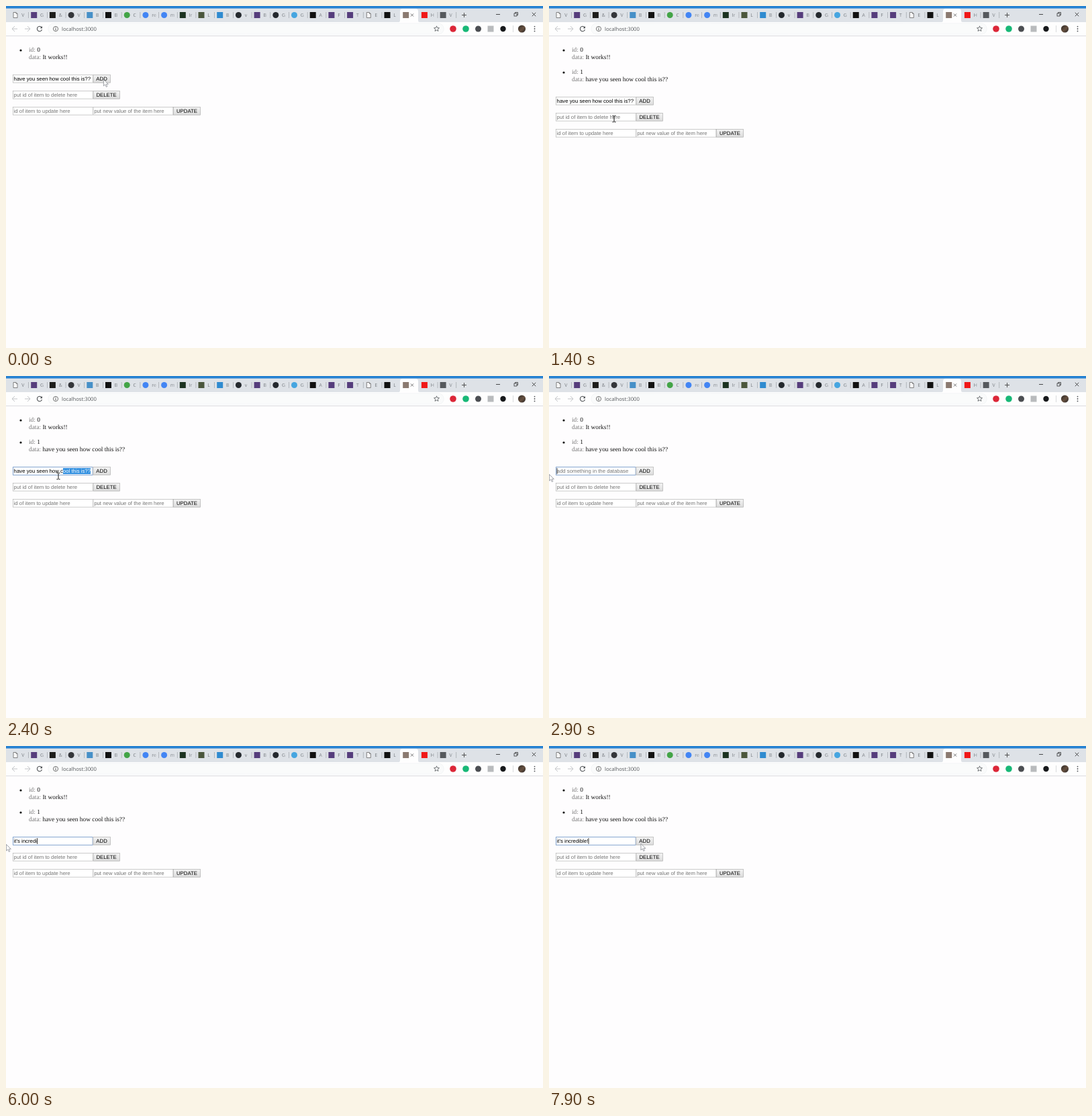
Recreate the animation shown at these times as an HTML page with a canvas. Size 800 px wide and 509 px high, loop 8 s.

```html
<!DOCTYPE html>
<html lang="en">
<head>
<meta charset="utf-8">
<title>Item list</title>
<style>
html, body { margin: 0; width: 100%; height: 100%; overflow: hidden; background: #fefdfe; }
canvas { display: block; width: 800px; height: 509px; }
</style>
</head>
<body>
<canvas id="stage"></canvas>
<script>
const W = 800, H = 509, LOOP = 8000, STEP = 100;
const canvas = document.getElementById('stage');
const ctx = canvas.getContext('2d');
const dpr = window.devicePixelRatio || 1;
canvas.width = W * dpr;
canvas.height = H * dpr;
ctx.textRendering = 'geometricPrecision';

const SERIF = '9.37px "Liberation Serif", "Times New Roman", serif';
const FORM = '7.81px "Liberation Sans", Arial, sans-serif';
const UI = '7.7px "Open Sans", sans-serif';
const TAB = '7px "Open Sans", sans-serif';
const MESSAGE = 'have you seen how cool this is??';

// form controls: field width, row height, border
const FIELD = 119.6, ROW = 12.4, EDGE = 0.6;

// [shape, colour, label]; d = document, s = square, c = circle
const TABS = [
  ['d', '', 'V'], ['s', '#563d7c', 'G'], ['s', '#1d1d1b', '&'], ['c', '#34363a', 'V'],
  ['s', '#4690c8', 'B'], ['s', '#111', 'B'], ['c', '#43a447', 'C'], ['c', '#4285f4', 're'],
  ['c', '#4285f4', 'm'], ['s', '#1c3321', 'Ir'], ['s', '#4b573c', 'L'], ['s', '#2f8bd0', 'B'],
  ['c', '#24292e', 'v'], ['s', '#563d7c', 'B'], ['c', '#24292e', 'G'], ['c', '#45a5e0', 'G'],
  ['s', '#111', 'A'], ['s', '#563d7c', 'F'], ['s', '#563d7c', 'T'], ['d', '', 'E'],
  ['s', '#111', 'L'], ['s', '#8b7a70', ''], ['s', '#f01818', 'H'], ['s', '#55595d', 'V']
];

// pointer stops: [time, x, y, shape]; a = arrow, i = text beam
const POINTER = [
  [0, 145, 109, 'a'], [600, 147, 112, 'a'], [700, 150, 117, 'a'], [800, 152, 121, 'a'],
  [900, 152, 123, 'a'], [1200, 146, 138, 'a'], [1300, 118, 160, 'i'], [1400, 97, 168, 'i'],
  [1500, 98, 173, 'i'], [1700, 112, 163, 'i'], [1900, 127, 146, 'i'], [2000, 130, 141, 'i'],
  [2100, 128, 141, 'i'], [2200, 122, 143, 'i'], [2300, 106, 145, 'i'], [2400, 78, 149, 'i'],
  [2500, 34, 152, 'i'], [2600, 0, 146, 'a'], [7400, 4, 146, 'a'], [7500, 32, 145, 'a'],
  [7600, 82, 143, 'a'], [7700, 130, 143, 'a'], [7800, 147, 144, 'a'], [7900, 136.5, 145, 'a']
];
// pauses before the next move
const RESTS = [0, 900, 2600];

const KEYS = [
  [2900, ''], [3500, 'i'], [3600, 'it'], [3800, "it's"], [3900, "it's "], [5100, "it's i"],
  [5300, "it's inc"], [5500, "it's incr"], [5700, "it's incre"], [5800, "it's incred"],
  [6000, "it's incredi"], [6200, "it's incredib"], [6300, "it's incredibl"],
  [6400, "it's incredible"], [6800, "it's incredible!"], [6900, "it's incredible!"]
];

// first selected character while dragging left
const DRAG = [[2100, 32], [2200, 31], [2300, 26], [2400, 19], [2500, 6], [2600, 0]];

function at(list, t) {
  let hit = list[0];
  for (const item of list) if (item[0] <= t) hit = item;
  return hit;
}

function rect(x, y, w, h, color) {
  ctx.fillStyle = color;
  ctx.fillRect(x, y, w, h);
}

function disc(x, y, r, color) {
  ctx.fillStyle = color;
  ctx.beginPath();
  ctx.arc(x, y, r, 0, Math.PI * 2);
  ctx.fill();
}

function path(points, stroke, width, fill, close) {
  ctx.beginPath();
  points.forEach(([x, y], i) => i ? ctx.lineTo(x, y) : ctx.moveTo(x, y));
  if (close) ctx.closePath();
  if (fill) { ctx.fillStyle = fill; ctx.fill(); }
  if (stroke) { ctx.strokeStyle = stroke; ctx.lineWidth = width; ctx.stroke(); }
}

function frame(x, y, w, h, edge, color) {
  ctx.strokeStyle = color;
  ctx.lineWidth = edge;
  ctx.strokeRect(x + edge / 2, y + edge / 2, w - edge, h - edge);
}

function text(str, x, y, font, color) {
  ctx.font = font;
  ctx.fillStyle = color;
  ctx.fillText(str, x, y);
}

function widthOf(str) {
  ctx.font = FORM;
  return ctx.measureText(str).width;
}

function drawTab([shape, color, label], i) {
  const x = 14 + i * 27.7, y = 13.5;
  const active = i === 21;
  if (active) {
    ctx.fillStyle = '#fefefe';
    ctx.beginPath();
    ctx.moveTo(585, 24);
    ctx.quadraticCurveTo(587, 24, 587, 21);
    ctx.lineTo(587, 8);
    ctx.quadraticCurveTo(587, 4, 591, 4);
    ctx.lineTo(610, 4);
    ctx.quadraticCurveTo(614, 4, 614, 8);
    ctx.lineTo(614, 21);
    ctx.quadraticCurveTo(614, 24, 616, 24);
    ctx.fill();
  }
  if (shape === 's') rect(x - 4.5, y - 4.5, 9, 9, color);
  else if (shape === 'c') disc(x, y, 4.5, color);
  else {
    path([[x - 3, y - 4], [x + 1, y - 4], [x + 3, y - 2], [x + 3, y + 4], [x - 3, y + 4]], '#666', 0.8, '#f8f8f8', true);
    path([[x + 1, y - 4], [x + 1, y - 2], [x + 3, y - 2]], '#666', 0.7);
  }
  if (label) {
    const g = ctx.createLinearGradient(x + 9, 0, x + 17, 0);
    g.addColorStop(0, '#5f6469');
    g.addColorStop(1, '#b9bdc2');
    text(label, x + 9.3, 16, TAB, g);
  }
  if (i !== 20 && !active) rect(x + 19.3, 9, 0.7, 9, '#a0a4a9');
}

function cross(x, y, r, color) {
  path([[x - r, y - r], [x + r, y + r]], color, 0.8);
  path([[x + r, y - r], [x - r, y + r]], color, 0.8);
}

function arrowIcon(x, y, dir) {
  path([[x - 4 * dir, y], [x + 4 * dir, y]], '#c3c5c8', 1);
  path([[x, y - 4], [x + 4 * dir, y], [x, y + 4]], '#c3c5c8', 1);
}

function drawBrowser() {
  rect(0, 0, W, 24, '#dee2e7');
  rect(0, 0, W, 3.6, '#2682d2');
  TABS.forEach(drawTab);
  cross(605, 13.5, 2.1, '#555');
  path([[679, 13.5], [686, 13.5]], '#444', 0.9);
  path([[682.5, 10], [682.5, 17]], '#444', 0.9);
  rect(730, 12, 6, 0.8, '#222');
  ctx.strokeStyle = '#222';
  ctx.lineWidth = 0.7;
  ctx.strokeRect(757, 11, 4, 4);
  path([[758.5, 11], [758.5, 9.5], [762.5, 9.5], [762.5, 13.5], [761, 13.5]], '#222', 0.7);
  cross(786.5, 12.5, 2.7, '#222');

  rect(0, 24, W, 20, '#fefefe');
  ctx.fillStyle = '#fafbfb';
  ctx.strokeStyle = '#edeff1';
  ctx.lineWidth = 0.6;
  ctx.beginPath();
  ctx.arc(71, 34, 8.2, Math.PI / 2, Math.PI * 1.5);
  ctx.arc(644, 34, 8.2, -Math.PI / 2, Math.PI / 2);
  ctx.closePath();
  ctx.fill();
  ctx.stroke();
  rect(0, 44, W, 0.8, '#d3d5d8');

  arrowIcon(13, 34, -1);
  arrowIcon(32, 34, 1);
  ctx.strokeStyle = '#4c4f53';
  ctx.lineWidth = 1.1;
  ctx.beginPath();
  ctx.arc(50, 34, 3.6, 0.3, Math.PI * 1.78);
  ctx.stroke();
  path([[54, 30], [54, 33.3], [50.8, 33.3]], null, 0, '#4c4f53', true);

  ctx.strokeStyle = '#555';
  ctx.lineWidth = 0.8;
  ctx.beginPath();
  ctx.arc(74, 34, 3.6, 0, Math.PI * 2);
  ctx.stroke();
  rect(73.5, 33.4, 1, 2.8, '#555');
  rect(73.5, 31.6, 1, 1, '#555');
  text('localhost:3000', 83, 36.5, UI, '#54575b');

  const star = [];
  for (let i = 0; i < 10; i++) {
    const a = -Math.PI / 2 + i * Math.PI / 5, r = i % 2 ? 1.9 : 4.2;
    star.push([641.5 + r * Math.cos(a), 34 + r * Math.sin(a)]);
  }
  path(star, '#55585c', 0.8, null, true);

  disc(666, 34, 4.8, '#dc2738');
  disc(685, 34, 4.8, '#18b877');
  disc(703.5, 34, 4.5, '#4b4e52');
  rect(717.5, 29.5, 9, 9, '#b9bbbd');
  disc(740.5, 34, 4.2, '#17191b');
  rect(755, 29, 0.8, 10, '#d0d2d5');
  const g = ctx.createLinearGradient(764, 29, 773, 39);
  g.addColorStop(0, '#35302b');
  g.addColorStop(0.55, '#66503f');
  g.addColorStop(1, '#302a28');
  disc(768.5, 34, 5.6, g);
  [30.6, 34, 37.4].forEach(y => disc(787.5, y, 0.9, '#4c4f53'));
}

function drawItem(id, data, y) {
  disc(22, y - 2, 1.6, '#111');
  text('id:', 34, y, SERIF, '#777');
  text(id, 46.2, y, SERIF, '#111');
  text('data:', 34, y + 11, SERIF, '#777');
  text(data, 54.5, y + 11, SERIF, '#111');
}

function drawInput(x, y, label, focused) {
  rect(x, y, FIELD, ROW, '#fff');
  if (focused) frame(x, y, FIELD, ROW + 0.5, 1, '#86a6d0');
  else frame(x, y, FIELD, ROW, EDGE, '#a9a9a9');
  if (label) text(label, x + 1.6, y + 8.9, FORM, '#757575');
}

function drawButton(x, y, w, label, pressed) {
  const g = ctx.createLinearGradient(0, y, 0, y + ROW);
  g.addColorStop(0, pressed ? '#d8d8d8' : '#f4f4f4');
  g.addColorStop(1, pressed ? '#ececec' : '#dcdcdc');
  rect(x, y, w, ROW, g);
  frame(x, y, w, ROW, EDGE, '#a6a6a6');
  ctx.textAlign = 'center';
  text(label, x + w / 2, y + 8.9, FORM, '#000');
  ctx.textAlign = 'left';
}

function drawCaret(x, y) {
  rect(x, y + 2, 0.8, 9, '#111');
}

function drawAddField(t, y) {
  const x = 11.6, base = y + 8.9;
  const typing = t >= KEYS[0][0];
  const [keyTime, typed] = at(KEYS, t);
  const label = typing && !typed ? 'add something in the database' : '';
  drawInput(10, y, label, t >= 2100);
  if (typing) {
    text(typed, x, base, FORM, '#000');
    if ((t - keyTime) % 1000 < 500) drawCaret(x + widthOf(typed), y);
    return;
  }
  text(MESSAGE, x, base, FORM, '#000');
  if (t < 2100) return;
  const from = at(DRAG, t)[1];
  const left = x + widthOf(MESSAGE.slice(0, from));
  const width = widthOf(MESSAGE.slice(from));
  if (width) {
    rect(left, y + 2, width, 9, '#3390e0');
    text(MESSAGE.slice(from), left, base, FORM, '#fff');
  } else drawCaret(left, y);
}

function drawPointer(t) {
  const i = POINTER.indexOf(at(POINTER, t));
  const next = POINTER[i + 1];
  let [start, x, y, shape] = POINTER[i];
  if (next && !RESTS.includes(start)) {
    const k = (t - start) / (next[0] - start);
    x += (next[1] - x) * k;
    y += (next[2] - y) * k;
  }
  if (shape === 'a') {
    const tip = [[0, 0], [0, 9.6], [2.3, 7.5], [3.9, 11], [5.5, 10.3], [4, 6.9], [7, 6.9]];
    path(tip.map(([a, b]) => [x + a + 0.4, y + b + 0.4]), '#7c8088', 0.7, '#fafafa', true);
  } else {
    path([[x, y - 4.5], [x, y + 4.5]], '#111', 1);
    for (const s of [-1, 1]) {
      path([[x - 2.5, y + 4.7 * s], [x - 0.6, y + 4.7 * s]], '#111', 1);
      path([[x + 0.6, y + 4.7 * s], [x + 2.5, y + 4.7 * s]], '#111', 1);
    }
  }
}

function draw(t) {
  ctx.setTransform(dpr, 0, 0, dpr, 0, 0);
  rect(0, 0, W, H, '#fefdfe');
  drawBrowser();
  const added = t >= 500;
  drawItem('0', 'It works!!', 68);
  if (added) drawItem('1', MESSAGE, 101);
  const y = added ? 135 : 102;
  const right = 10 + FIELD;
  drawAddField(t, y);
  drawButton(right, y, 26, 'ADD', t === 400);
  drawInput(10, y + 24, 'put id of item to delete here');
  drawButton(right, y + 24, 40, 'DELETE');
  drawInput(10, y + 48, 'id of item to update here');
  drawInput(right, y + 48, 'put new value of the item here');
  drawButton(right + FIELD, y + 48, 40.6, 'UPDATE');
  drawPointer(t);
}

const begin = performance.now();
function tick() {
  const t = (performance.now() - begin) % LOOP;
  draw(Math.floor(t / STEP) * STEP);
  requestAnimationFrame(tick);
}
tick();
</script>
</body>
</html>
```
